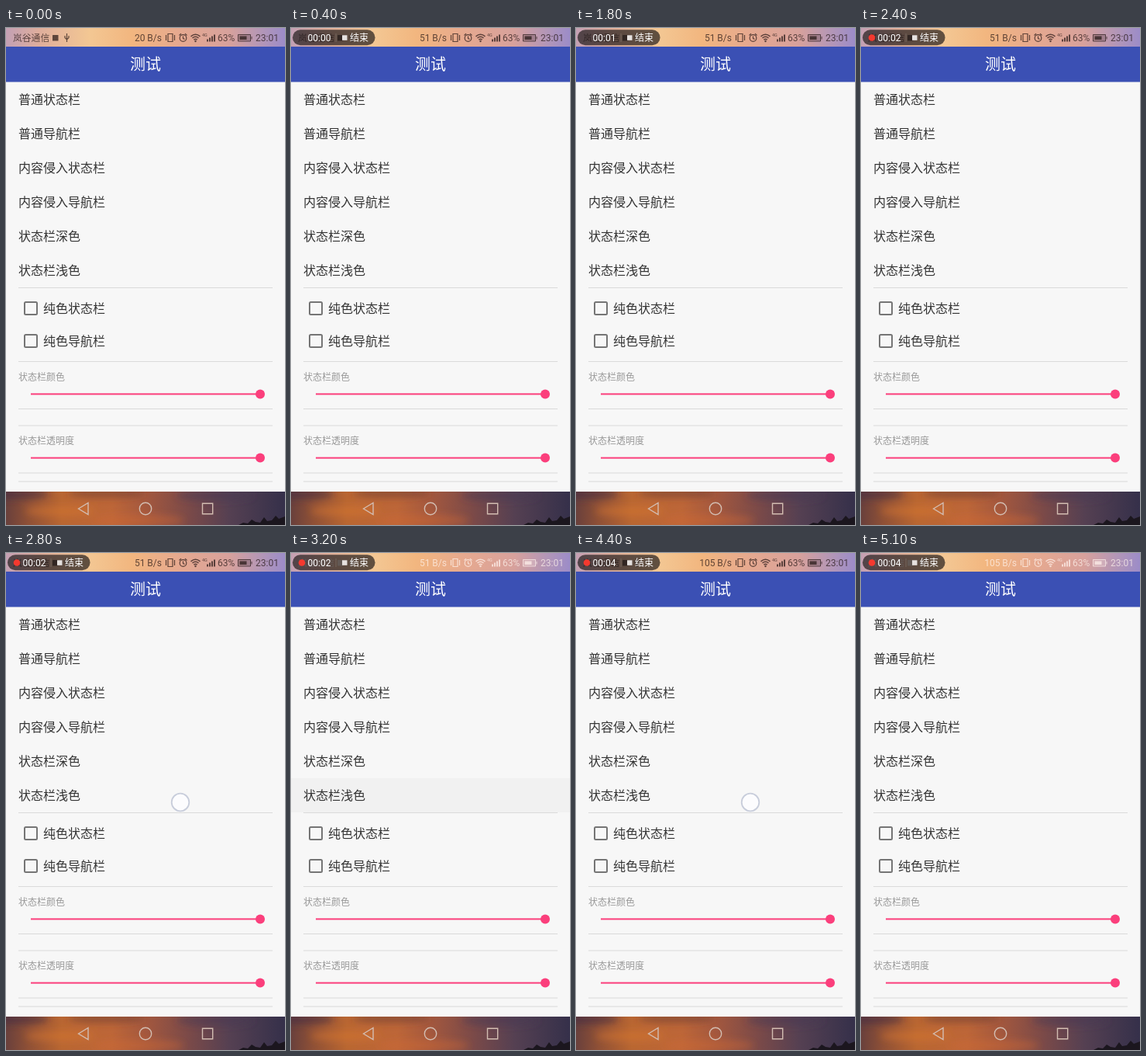
Recreate the animation shown at these times as an HTML page. Size 360 by 640 pixels, loop 5300 ms.

```html
<!DOCTYPE html>
<html lang="zh-CN">
<head>
<meta charset="utf-8">
<title>测试</title>
<style>
html, body { margin: 0; width: 100%; height: 100%; overflow: hidden; background: #f7f7f7; }
svg { display: block; width: 360px; height: 640px; font-family: Roboto, "Noto Sans CJK SC", "Noto Sans CJK", sans-serif; }
</style>
</head>
<body>
<svg id="stage" viewBox="0 0 360 640"></svg>
<script>
const LOOP = 5300, SECOND = 1100;
const DARK = 'rgba(35,22,20,.7)', LIGHT = 'rgba(255,242,236,.72)', INK = '#333';
// each tap: start time and row (0 = dark icons, 1 = light icons)
const TAPS = [[1100, 0], [2700, 1], [3500, 0], [4400, 1]];

const text = (x, cy, size, str, fill, extra = '') =>
  `<text x="${x}" y="${Math.round(cy + size * .37)}" font-size="${size}" fill="${fill}" ${extra}>${str}</text>`;
const rect = (x, y, w, h, fill, extra = '') =>
  `<rect x="${x}" y="${y}" width="${w}" height="${h}" fill="${fill}" ${extra}/>`;
const line = (d, width = 1.2) => `<path d="${d}" fill="none" stroke="currentColor" stroke-width="${width}"/>`;
const cloud = (x, y, rx, ry, fill) => `<ellipse cx="${x}" cy="${y}" rx="${rx}" ry="${ry}" fill="${fill}"/>`;
const gradient = (id, stops) => `<linearGradient id="${id}">` +
  stops.map(([o, c]) => `<stop offset="${o}" stop-color="${c}"/>`).join('') + '</linearGradient>';

const defs = '<defs>' +
  gradient('sky', [[0, '#c3a0b4'], [.12, '#dfae9c'], [.3, '#f3c793'], [.45, '#f2b67f'], [.62, '#e6a98f'], [.8, '#d7a19c'], [.92, '#b296b8'], [1, '#9c8cc8']]) +
  gradient('dusk', [[0, '#69403c'], [.08, '#8f5036'], [.2, '#b96632'], [.38, '#bd6638'], [.5, '#a4583e'], [.65, '#7c4a48'], [.8, '#554052'], [1, '#35304a']]) +
  `<filter id="soft" x="-50%" y="-100%" width="200%" height="300%"><feGaussianBlur stdDeviation="5"/></filter>
  <clipPath id="bar">${rect(0, 597, 360, 43, '#000')}</clipPath></defs>`;

const icons = `<g id="icons">
  ${text(9, 12.5, 11.8, '岚谷通信', 'currentColor')}
  ${rect(60, 9, 7.5, 7.5, 'currentColor', 'rx=".5"')}
  ${line('M78.5 7V18M76 10V12.5L78.5 15L81 12.5V10')}
  ${text(201, 12.5, 12, '', 'currentColor', 'id="speed" text-anchor="end"')}
  ${line('M209 7.5H215V17.5H209ZM206.5 9V16M217.5 9V16')}
  <circle cx="228.5" cy="13" r="4.3" fill="none" stroke="currentColor" stroke-width="1.2"/>
  ${line('M228.5 10.5V13.3L230.5 14.5M223.5 9.5L226 7.2M231 7.2L233.5 9.5')}
  ${line('M238.5 10.8Q244.5 5.8 250.5 10.8M240.5 13Q244.5 9.6 248.5 13M242.4 15.2Q244.5 13.5 246.6 15.2', 1.5)}
  <circle cx="244.5" cy="17" r="1.2" fill="currentColor"/>
  ${text(253, 9, 5.5, '4G', 'currentColor')}
  ${[0, 1, 2, 3].map(i => rect(259 + i * 3, 14.5 - i * 2, 2, 3 + i * 2, 'currentColor')).join('')}
  ${text(273, 12.5, 12, '63%', 'currentColor')}
  ${line('M299.5 8.5H315.5V17H299.5ZM317 11V14.5', 1)}
  ${rect(300, 9, 15, 7.5, 'currentColor', 'opacity=".3"')}
  ${rect(301.5, 10.5, 9, 4.5, 'currentColor')}
  ${text(322, 12.5, 12, '23:01', 'currentColor')}
</g>`;

const pill = `<g id="pill">
  ${rect(2, 2.3, 106.5, 20, 'rgba(28,24,24,.68)', 'rx="10"')}
  <circle id="dot" cx="14" cy="12.5" r="4.3" fill="#f5392f"/>
  ${text(21.5, 12.5, 12, '', '#fff', 'id="clock"')}
  ${rect(57.5, 7, 1, 11, 'rgba(255,255,255,.16)')}
  ${rect(66, 9.3, 6.5, 6.5, '#e6e2e0')}
  ${text(76, 12.5, 12, '结束', '#fff')}
</g>`;

const rows = ['普通状态栏', '普通导航栏', '内容侵入状态栏', '内容侵入导航栏', '状态栏深色', '状态栏浅色'];
const checkbox = (cy, label) =>
  rect(24, cy - 8, 16, 16, 'none', 'rx="1.5" stroke="#757575" stroke-width="2"') + text(48, cy, 16, label, INK);
const slider = (cy, label) => text(16, cy - 22, 12, label, '#999') +
  rect(32, cy - 1, 296, 2, '#fb3f7c') + `<circle cx="328" cy="${cy}" r="6" fill="#fb3f7c"/>`;

const page = rect(0, 24, 360, 573, '#f7f7f7') + rect(0, 24, 360, 45.5, '#3b50b4') +
  text(180, 47, 20, '测试', '#fff', 'text-anchor="middle"') +
  rect(0, 246, 360, 44, '#000', 'id="glow"') +
  rows.map((r, i) => text(16, 92 + i * 44, 16, r, INK)).join('') +
  [334, 429, 490, 511.5, 572.5, 583.5].map(y => rect(16, y, 328, 1, '#dadada')).join('') +
  checkbox(361, '纯色状态栏') + checkbox(403, '纯色导航栏') +
  slider(471.4, '状态栏颜色') + slider(553.6, '状态栏透明度') +
  '<circle id="touch" cx="225" r="11.3" fill="rgba(252,252,255,.8)" stroke="#c8cddb" stroke-width="1.8"/>';

const nav = `<g clip-path="url(#bar)">${rect(0, 597, 360, 43, 'url(#dusk)')}<g filter="url(#soft)">
  ${cloud(15, 600, 40, 7, 'rgba(70,48,66,.6)')}${cloud(130, 599, 50, 6, 'rgba(100,56,50,.5)')}
  ${cloud(70, 622, 45, 7, 'rgba(214,118,50,.5)')}${cloud(170, 634, 60, 7, 'rgba(206,104,56,.45)')}
  ${cloud(270, 602, 50, 7, 'rgba(72,56,82,.5)')}</g>
  <path d="M300 640L306 637L312 638L317 633L322 636L328 637L333 630L337 635L343 634L348 628L352 632L360 629V640Z" fill="#1b161e"/></g>
  <g fill="none" stroke="#d3bdb2" stroke-width="1.4"><path d="M93.5 619L106 611.5V626.5Z"/>
  <circle cx="180" cy="619" r="7.7"/><path d="M253.5 612.3H266.7V625.7H253.5Z"/></g>`;

const $ = id => document.getElementById(id);
$('stage').innerHTML = defs + rect(0, 0, 360, 24, 'url(#sky)') + icons + pill + page + nav;

const clamp = v => Math.max(0, Math.min(1, v));
const show = (el, on) => el.setAttribute('visibility', on ? 'visible' : 'hidden');

function draw(now) {
  const t = Math.floor(now % LOOP / 100) * 100;
  const sec = Math.floor(t / SECOND);
  show($('pill'), t >= 200);
  show($('dot'), t >= 200 && sec > 0 && sec % 2 === 0);
  $('clock').textContent = '00:0' + sec;
  $('speed').textContent = (t < 200 ? 20 : t < 3500 ? 51 : 105) + ' B/s';

  let light = 0, glow = 0, touch = false;
  for (const [start, row] of TAPS) {
    const age = t - start;
    if (age < 0) break;
    if (age >= 300) light = row;
    glow = Math.min(clamp((age - 150) / 100), clamp((650 - age) / 300));
    touch = age < 300;
    $('glow').setAttribute('y', 246 + row * 44);
    $('touch').setAttribute('cy', 277 + row * 44);
  }
  $('icons').style.color = light ? LIGHT : DARK;
  $('glow').setAttribute('opacity', glow * .045);
  show($('touch'), touch);
  requestAnimationFrame(() => draw(performance.now() - origin));
}
const origin = performance.now();
draw(0);
</script>
</body>
</html>
```
